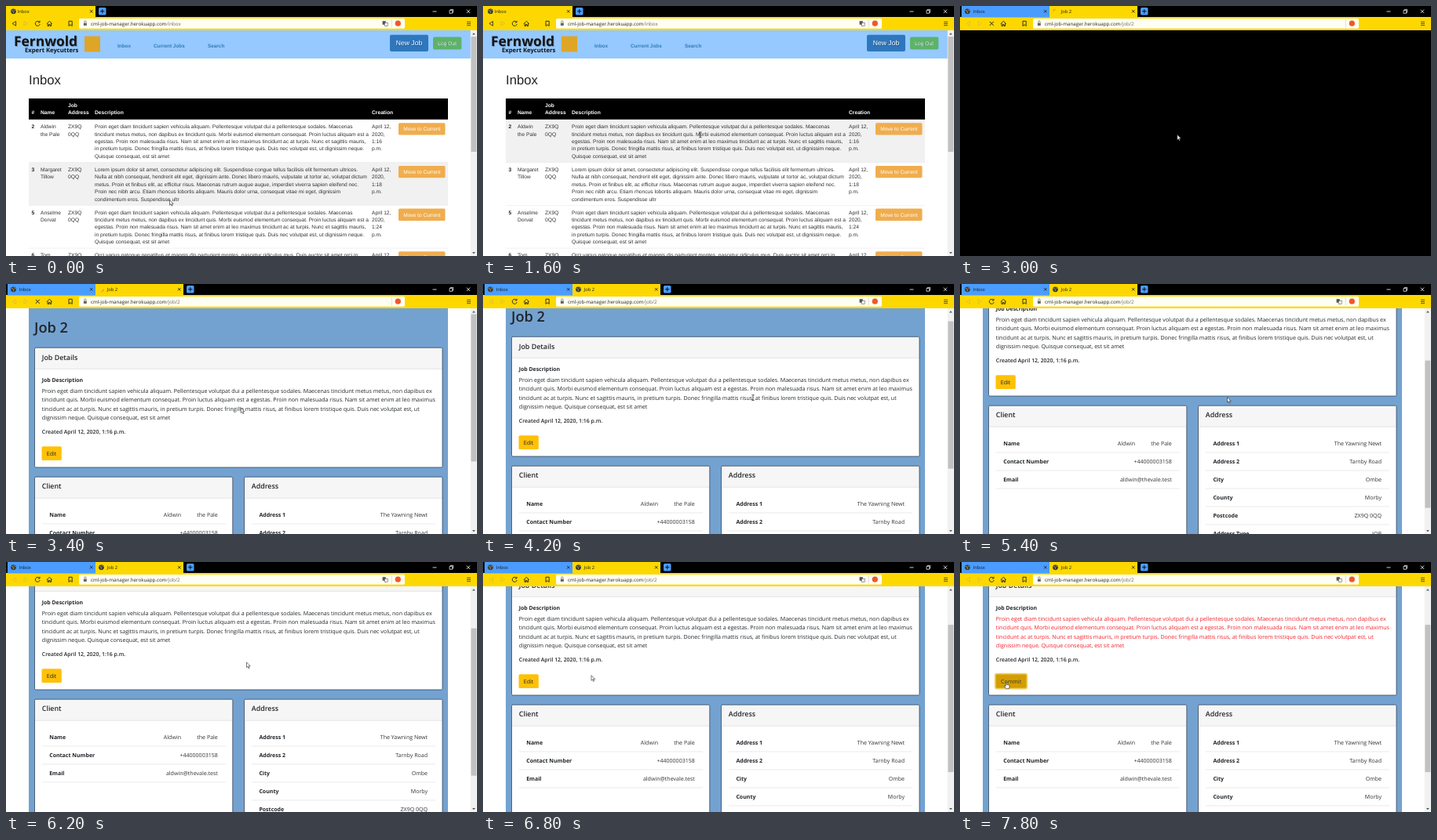
Write an HTML page that moves like this. It is 600 px wide and 319 px high and loops after 8 s.

```html
<!DOCTYPE html>
<html lang="en">
<head>
<meta charset="utf-8">
<title>Job manager</title>
<style>
  html, body { margin: 0; width: 100%; height: 100%; overflow: hidden; background: #fff; }
  svg { display: block; width: 100vw; height: 100vh; }
  text { font-family: "Open Sans", "Noto Sans", sans-serif; text-rendering: geometricPrecision; white-space: pre; }
  .arial { font-family: "Liberation Sans", Arial, sans-serif; }
</style>
</head>
<body>
<svg id="stage" viewBox="0 0 600 319" preserveAspectRatio="none"></svg>
<script>
const LOOP = 8000, STEP = 200;
const YELLOW = '#fdd800', BLUE = '#4a9cff', INK = '#212529', GREY_INK = '#333';

// ---- drawing helpers ----
const rect = (x, y, w, h, fill, more = '') =>
  `<rect x="${x}" y="${y}" width="${w}" height="${h}" fill="${fill}" ${more}/>`;
const line = (d, stroke, width = 1, more = '') =>
  `<path d="${d}" fill="none" stroke="${stroke}" stroke-width="${width}" ${more}/>`;
const text = (x, y, str, size, fill = INK, more = '') =>
  `<text x="${x}" y="${y}" font-size="${size}" fill="${fill}" ${more}>${str}</text>`;
const arial = (x, y, str, size = 6.66, fill = GREY_INK, more = '') =>
  text(x, y, str, size, fill, 'class="arial" ' + more);
const lines = (draw, x, y, gap, list, ...rest) =>
  list.map((s, i) => draw(x, y + i * gap, s, ...rest)).join('');
const group = (id, body, more = '') => `<g id="${id}" ${more}>${body}</g>`;
const BOLD = 'font-weight="700"', SEMI = 'font-weight="600"';
const END = 'text-anchor="end"', MID = 'text-anchor="middle"';

// ---- browser frame ----
const globe = x => `<circle cx="${x}" cy="6.8" r="3.4" fill="#3a3a2e"/>` +
  line(`M${x - 2.4} 5.6l2 .6l.8 1.6l-1 1.4M${x + .6} 4.2l1 1.2l1.2 .2`, '#b9b48a', .8);
const cross = (x, y, r, color, w = .9) =>
  line(`M${x - r} ${y - r}l${2 * r} ${2 * r}m0 ${-2 * r}l${-2 * r} ${2 * r}`, color, w);
const tab = (x, w, title, fill, icon) => rect(x, 0, w, 14.5, fill) + icon +
  text(x + 14.6, 9.1, title, 5.8, '#1c1c10') + cross(x + w - 5.3, 6.8, 1.7, '#222');
const plus = x => rect(x, 2, 9.5, 9.5, BLUE, 'rx="1.5"') +
  line(`M${x + 4.75} 4.1v5.3m-2.65 -2.65h5.3`, '#111', 1);
const url = path => text(108, 24.7, `cml-job-manager.herokuapp.com<tspan fill="#666">${path}</tspan>`, 6.2, '#222');
const arrows = (back, next) =>
  line('M12.6 19.6L8 22.4L12.6 25.2Z', back, .9) + line('M23 19.6L27.6 22.4L23 25.2Z', next, .9);

const chrome =
  rect(0, 0, 600, 14, '#000') + rect(0, 14, 600, 17, YELLOW) +
  line('M543.5 7h5', '#fff', .8) + line('M565 5.5h3.6v3.8h-3.6zM566.2 5.4v-1h3.5v3.7h-1', '#fff', .7) +
  cross(589, 6.8, 2.2, '#fff', .8) +
  line('M52 22.6L55.3 19.3L58.6 22.6M53 22v3.5h1.6v-2h1.4v2h1.6V22', '#222', .9) +
  line('M80 19.3h4.2v6.2l-2.1-1.7l-2.1 1.7z', '#222', .9) +
  rect(93, 16, 415, 12.7, '#fffef4', 'rx="1.5"') +
  rect(98.9, 21.6, 3.9, 3.4, '#666') + line('M99.7 21.5v-1.3a1.2 1.2 0 0 1 2.4 0v1.3', '#666', .7) +
  line('M491.3 17v10.7', '#ccc', .6) +
  '<circle cx="499.3" cy="22.2" r="3.6" fill="#f2562a"/>' +
  line('M587 20.3h5M587 22.5h5M587 24.7h5', '#333', .8) +
  group('oneTab', tab(0, 114, 'Inbox', YELLOW, globe(9.5)) + plus(118) + url('/inbox') + arrows('#333', '#d8bd3a')) +
  group('twoTabs', tab(2, 112, 'Inbox', BLUE, globe(9.5)) + tab(114, 112, 'Job 2', YELLOW, '') +
    plus(230) + url('/job/2') + arrows('#dfc22c', '#dfc22c')) +
  group('icon', globe(121.5)) +
  group('spinner', line('M119 6.8a2.6 2.6 0 0 1 2.6 -2.6', '#e8742c', .9)) +
  group('stop', cross(40.3, 22.4, 2.5, '#222', 1)) +
  group('ready', line('M42.6 20.5a3 3 0 1 0 .6 2.6M43 18.8v2.2h-2.2', '#222', .9) +
    rect(479.6, 19.2, 4.2, 4.6, '#555') + rect(482.4, 21.3, 3.8, 4, '#fff', 'stroke="#555" stroke-width=".6"'));

const scrollbar = rect(591.7, 31, 8.3, 288, '#f1f1f1') +
  '<path d="M593.9 36.4l2-2.2l2 2.2zM593.9 314l2 2.2l2-2.2z" fill="#555"/>' +
  rect(592.4, 39, 7, 148, '#c1c1c1', 'id="thumb"');

// ---- inbox page ----
const proin = [
  'Proin eget diam tincidunt sapien vehicula aliquam. Pellentesque volutpat dui a pellentesque sodales. Maecenas',
  'tincidunt metus metus, non dapibus ex tincidunt quis. Morbi euismod elementum consequat. Proin luctus aliquam est a',
  'egestas. Proin non malesuada risus. Nam sit amet enim at leo maximus tincidunt ac at turpis. Nunc et sagittis mauris,',
  'in pretium turpis. Donec fringilla mattis risus, at finibus lorem tristique quis. Duis nec volutpat est, ut dignissim neque.',
  'Quisque consequat, est sit amet'];
const lorem = [
  'Lorem ipsum dolor sit amet, consectetur adipiscing elit. Suspendisse congue tellus facilisis elit fermentum ultrices.',
  'Nulla at nibh consequat, hendrerit elit eget, dignissim ante. Donec libero mauris, vulputate ut tortor ac, volutpat dictum',
  'metus. Proin et finibus elit, ac efficitur risus. Maecenas rutrum augue augue, imperdiet viverra sapien eleifend nec.',
  'Proin nec nibh arcu. Etiam rhoncus lobortis aliquam. Mauris dolor urna, consequat vitae mi eget, dignissim',
  'condimentum eros. Suspendisse ultr'];
const orci = ['Orci varius natoque penatibus et magnis dis parturient montes, nascetur ridiculus mus. Duis auctor sit amet orci in'];
const jobs = [
  [2, ['Aldwin', 'the Pale'], proin, '1:16'],
  [3, ['Margaret', 'Tillow'], lorem, '1:18'],
  [5, ['Anselme', 'Dorvat'], proin, '1:24'],
  [6, ['Tom', 'Ruddle'], orci, '1:31']];
const ROW_TOP = 145, ROW_H = 54.7, LEAD = 9.375;

const jobRow = ([id, name, about, time], i) => {
  const top = ROW_TOP + i * ROW_H, y = top + 11.3;
  const column = (x, list) => lines(arial, x, y, LEAD, list);
  return rect(29, top, 534, ROW_H, '#fff', 'class="row"') + line(`M29 ${top}h534`, '#dee2e6', .5) +
    arial(32.5, y, id, 6.7, INK, BOLD) + column(44, name) + column(79, ['ZX9Q', '0QQ']) +
    column(113, about) + column(466, ['April 12,', '2020,', time, 'p.m.']) +
    rect(500, top + 4.2, 59.5, 15.4, '#f0ad4e', 'rx="1.6"') +
    arial(529.8, top + 14.2, 'Move to Current', 6.6, '#fff', MID);
};
const head = (x, str, y = 138.3) => arial(x, y, str, 6.7, '#fff', BOLD);
const shaded = (x, y, str, size, shade) =>
  arial(x + .5, y + .5, str, size, shade, MID) + arial(x, y, str, size, '#fff', MID);
const inbox = rect(0, 31, 600, 288, '#fff') + rect(0, 31, 592, 36, '#95c9ff') +
  text(10.8, 51.7, 'Fernwold', 17.4, '#6f93b8', BOLD) + text(10, 51, 'Fernwold', 17.4, '#151515', BOLD) +
  text(24, 59.2, 'Expert Keycutters', 7.7, '#151515', BOLD) + rect(100, 38.5, 20, 20, '#dfa526') +
  [[142, 'Inbox'], [188, 'Current Jobs'], [257, 'Search']].map(([x, s]) => arial(x, 53, s, 6.4, '#337ab7', BOLD)).join('') +
  rect(489, 36.8, 49, 21.2, '#2f77bd', 'rx="2"') + shaded(513.5, 50.2, 'New Job', 8.6, '#1b4a78') +
  rect(544, 39.5, 36.3, 16, '#5cb36a', 'rx="2"') + shaded(562.2, 49.8, 'Log Out', 6.7, '#2c6a38') +
  arial(29, 100, 'Inbox', 16.7, INK) + rect(29, 118, 534, 27, '#000') +
  head(32.5, '#') + head(44, 'Name') + head(79, 'Job', 129) + head(79, 'Address') + head(113, 'Description') + head(466, 'Creation') +
  jobs.map(jobRow).join('');

// ---- job page, laid out at a scroll of BASE ----
const BASE = 14;
const about = [
  'Proin eget diam tincidunt sapien vehicula aliquam. Pellentesque volutpat dui a pellentesque sodales. Maecenas tincidunt metus metus, non dapibus ex',
  'tincidunt quis. Morbi euismod elementum consequat. Proin luctus aliquam est a egestas. Proin non malesuada risus. Nam sit amet enim at leo maximus',
  'tincidunt ac at turpis. Nunc et sagittis mauris, in pretium turpis. Donec fringilla mattis risus, at finibus lorem tristique quis. Duis nec volutpat est, ut',
  'dignissim neque. Quisque consequat, est sit amet'];
const card = (x, y, w, h, title) => rect(x, y, w, h, '#fff', 'rx="1.6"') +
  rect(x, y, w, 27, '#f6f6f6', 'rx="1.6"') + line(`M${x} ${y + 27}h${w}`, '#d4d4d4', .6) +
  rect(x, y, w, h, 'none', 'rx="1.6" stroke="#2f4258" stroke-width=".8"') +
  text(x + 9.3, y + 15.2, title, 8.9, INK, SEMI);
const field = (x, i, label, value) => {
  const y = 283 + 23 * i;
  return text(x + 9.4, y, label, 7, INK, BOLD) + text(x + 224, y, value, 7.05, GREY_INK, END) +
    line(`M${x} ${y + 9}h234`, '#dcdcdc', .6);
};
const address = [['Address 1', 'The Yawning Newt'], ['Address 2', 'Tarnby Road'], ['City', 'Ombe'],
  ['County', 'Morby'], ['Postcode', 'ZX9Q 0QQ'], ['Address Type', 'JOB']];
const job = rect(29, -40, 534, 520, '#74a2d0') +
  text(36, 48.3, 'Job 2', 18.2, INK, SEMI) +
  card(36.5, 67.3, 519.5, 152.7, 'Job Details') +
  text(45.8, 110.7, 'Job Description', 6.9, INK, BOLD) +
  group('about', lines(text, 45.8, 125, 11.27, about, 7.08, 'inherit'), 'fill="#212529"') +
  text(45.8, 176.5, 'Created April 12, 2020, 1:16 p.m.', 6.9, INK, SEMI) +
  group('edit', rect(45.5, 193.2, 25.3, 17.8, '#ffc107', 'rx="1.6" id="editFace"') + text(58.1, 204.7, 'Edit', 7.05, INK, MID)) +
  group('commit', rect(44.9, 192.6, 40.4, 19, '#d39e00', 'rx="2" stroke="#f0cd62" stroke-width="1.7"') +
    text(65.1, 204.7, 'Commit', 7.05, '#3a3a30', MID)) +
  card(36.5, 232.2, 252.3, 187, 'Client') + card(303.5, 232.2, 252.5, 187, 'Address') +
  field(45.8, 0, 'Name', 'the Pale') + text(223, 283, 'Aldwin', 7.05, GREY_INK, END) +
  field(45.8, 1, 'Contact Number', '+44000003158') + field(45.8, 2, 'Email', 'aldwin@thevale.test') +
  address.map(([label, value], i) => field(313, i, label, value)).join('');

// ---- pointers, with the hot spot at 0,0 ----
const outline = 'stroke="#222" stroke-width=".6" stroke-linejoin="round"';
const pointers =
  group('arrow', `<path d="M0 0v6.6l1.5-1.4l1.1 2.5l1.1-.5l-1.1-2.4h2.1z" fill="#fff" ${outline}/>`) +
  group('beam', line('M-1.6 -3.4h1.2l.4.4l.4-.4h1.2M0 -3v6M-1.6 3.4h1.2l.4-.4l.4.4h1.2', '#222', .8)) +
  group('hand', `<path d="M-.7 0q.7-.7 1.4 0v3l2.8.6q.8.3.6 1.4l-.6 3.2h-3.7l-2.4-3.4q.4-1 1.9.1z" fill="#fff" ${outline}/>`);

const stage = document.getElementById('stage');
stage.innerHTML = group('inbox', inbox) +
  group('jobPage', rect(0, 31, 600, 288, '#fff') + group('job', job)) +
  group('blank', rect(0, 31, 600, 288, '#000')) +
  group('bar', scrollbar) + group('frame', chrome) + group('pointer', pointers);

const el = id => document.getElementById(id);
const show = (id, on) => el(id).setAttribute('display', on ? 'inline' : 'none');
const rows = [...document.querySelectorAll('.row')];

// ---- motion ----
const OPEN = 2200, PAINT = 3200, LOADED = 3800, EDIT_HOVER = 7000, EDITED = 7600;
const cursorKeys = [[0, 208.5, 247.5], [400, 214, 274], [800, 240, 215], [1400, 276.8, 164.3],
  [3200, 276.8, 164.3], [3800, 344, 145], [4400, 344, 145], [5000, 340.5, 144.5], [5600, 340.5, 144.5],
  [6200, 306.5, 128], [6400, 290, 130], [7000, 62, 152], [7200, 59, 153.5], [LOOP, 59, 153.5]];
const scrollKeys = [[0, 0], [3900, 0], [4200, 14], [4400, 31], [4600, 33], [4800, 58], [5000, 64], [5200, 76],
  [5400, 91], [5600, 94], [5800, 94], [6000, 88], [6200, 71], [6400, 64], [LOOP, 64]];

function at(keys, t) {
  const i = Math.max(1, keys.findIndex(k => k[0] > t));
  const a = keys[i - 1], b = keys[i], p = (t - a[0]) / (b[0] - a[0]);
  return a.slice(1).map((v, n) => v + (b[n + 1] - v) * p);
}

function draw(ms) {
  const t = Math.floor((ms % LOOP) / STEP) * STEP;
  const opened = t >= OPEN, painted = t >= PAINT, loaded = t >= LOADED;
  const loading = opened && !loaded, edited = t >= EDITED;
  const [x, y] = at(cursorKeys, t), [scroll] = at(scrollKeys, t);

  show('inbox', !opened);
  show('oneTab', !opened);
  show('twoTabs', opened);
  show('blank', opened && !painted);
  show('jobPage', painted);
  show('bar', !opened || painted);
  show('icon', loaded);
  show('spinner', loading);
  show('stop', loading);
  show('ready', !loading);
  el('spinner').setAttribute('transform', `rotate(${(t - 3000) * .45} 121.6 6.8)`);

  const hovered = Math.floor((y - ROW_TOP) / ROW_H);
  rows.forEach((r, i) => r.setAttribute('fill', i === hovered ? '#f1f1f1' : '#fff'));

  el('job').setAttribute('transform', `translate(0 ${BASE - scroll})`);
  el('thumb').setAttribute('y', painted ? 38.5 + scroll * .65 : 39);
  el('thumb').setAttribute('height', painted ? 188 : 147);
  el('about').setAttribute('fill', edited ? '#f3202a' : INK);
  el('editFace').setAttribute('fill', t >= EDIT_HOVER ? '#e0a800' : '#ffc107');
  show('edit', !edited);
  show('commit', edited);

  const beam = (t >= 1200 && t < 2000) || (t >= 3600 && t < 4600);
  const hand = t >= EDIT_HOVER;
  show('beam', beam);
  show('hand', hand);
  show('arrow', !beam && !hand);
  el('pointer').setAttribute('transform', `translate(${x} ${y})`);
}

const start = performance.now();
function tick() {
  draw(performance.now() - start);
  requestAnimationFrame(tick);
}
tick();
</script>
</body>
</html>
```
